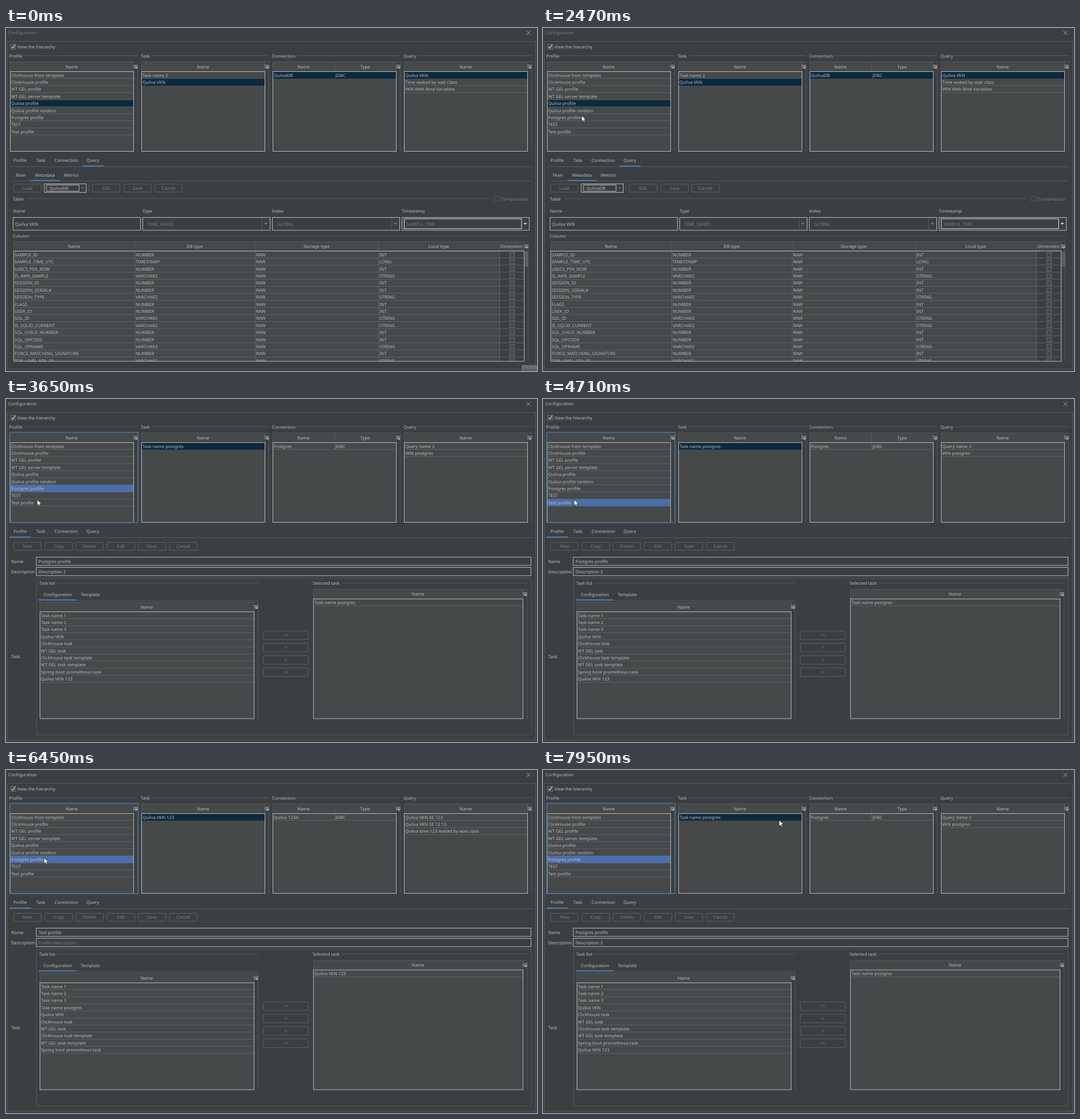
These frames come from a looping animation (930 by 602 pixels, 8000 ms). An HTML page:

```html
<!DOCTYPE html>
<html lang="en">
<head>
<meta charset="utf-8">
<title>Configuration</title>
<style>
html, body { margin: 0; width: 930px; height: 602px; overflow: hidden; background: #3c3f41; }
svg { display: block; }
text { font: 7.7px "Noto Sans", "Open Sans", sans-serif; fill: #bbb; text-rendering: geometricPrecision; white-space: pre; }
.mid { text-anchor: middle; }
.dim { fill: #7d7f80; }
.rule { stroke: #55585a; fill: none; }
.grid { stroke: #66696b; stroke-width: .8; }
.edge { stroke: #b8baba; fill: none; }
.cell { fill: #45494a; }
.btn { fill: none; stroke: #5e6162; }
.box { fill: #43494a; stroke: #6b6e70; }
.idle { fill: #0d293e; }
.pick { fill: #4b6eaf; }
.tab { fill: #4a7ebb; }

.on { animation: 8s step-end infinite; }
.hint { animation-name: hint; }
.before { animation-name: before; }
.after { animation-name: after; }
.pickPg { animation-name: pickPg; }
.pickTest { animation-name: pickTest; }
.dataFirst { animation-name: dataFirst; }
.dataPg { animation-name: dataPg; }
.dataTest { animation-name: dataTest; }
@keyframes hint { 0% { opacity: 1 } .875%, 100% { opacity: 0 } }
@keyframes before { 0% { opacity: 1 } 34.25%, 100% { opacity: 0 } }
@keyframes after { 0% { opacity: 0 } 34.25%, 100% { opacity: 1 } }
@keyframes pickPg { 0%, 58.875% { opacity: 0 } 34.25%, 80.625%, 100% { opacity: 1 } }
@keyframes pickTest { 0%, 80.625%, 100% { opacity: 0 } 58.875% { opacity: 1 } }
@keyframes dataFirst { 0% { opacity: 1 } 35.125%, 100% { opacity: 0 } }
@keyframes dataPg { 0%, 59.75% { opacity: 0 } 35.125%, 81.5%, 100% { opacity: 1 } }
@keyframes dataTest { 0%, 81.5%, 100% { opacity: 0 } 59.75% { opacity: 1 } }

#cursor { animation: move 8s linear infinite; }
@keyframes move {
  0% { transform: translate(945px, 610px); }
  .875% { transform: translate(925px, 598px); animation-timing-function: steps(4, jump-start); }
  4% { transform: translate(270px, 180px); animation-timing-function: steps(4, jump-start); }
  7.1% { transform: translate(114px, 88px); }
  13.875% { transform: translate(114px, 88px); animation-timing-function: steps(8, jump-start); }
  20.675% { transform: translate(89px, 122px); }
  24% { transform: translate(89px, 122px); animation-timing-function: steps(9, jump-start); }
  31.65% { transform: translate(67.5px, 153.5px); }
  36.875% { transform: translate(67.5px, 153.5px); animation-timing-function: steps(9, jump-start); }
  44.64% { transform: translate(57px, 174px); }
  44.75% { transform: translate(57px, 174px); animation-timing-function: steps(2, jump-start); }
  46.45% { transform: translate(54.5px, 176.5px); }
  63.125% { transform: translate(54.5px, 176.5px); animation-timing-function: steps(5, jump-start); }
  67.25% { transform: translate(66.5px, 154px); }
  85.5% { transform: translate(66.5px, 154px); animation-timing-function: steps(9, jump-start); }
  93.26% { transform: translate(477px, 121px); animation-timing-function: steps(3, jump-start); }
  95.85% { transform: translate(458px, 112px); }
  95.875% { transform: translate(458px, 112px); animation-timing-function: steps(5, jump-start); }
  100% { transform: translate(413.5px, 88px); }
}
</style>
</head>
<body>
<svg id="stage" width="930" height="602" viewBox="0 0 930 602"></svg>
<script>
const ROW = 12.41;

const text = (x, y, s, cls = '') =>
  `<text x="${x}" y="${y}" class="${cls}">${s.replace(/</g, '&lt;').replace(/>/g, '&gt;')}</text>`;
const rect = (x, y, r, b, cls) =>
  `<rect x="${x}" y="${y}" width="${r - x}" height="${b - y}" class="${cls}"/>`;
const line = (x1, y1, x2, y2, cls = 'rule') =>
  `<line x1="${x1}" y1="${y1}" x2="${x2}" y2="${y2}" class="${cls}"/>`;
const on = (name, body) => `<g class="on ${name}">${body}</g>`;

const button = (x, y, r, label, h = 14) =>
  `<rect x="${x + .5}" y="${y + .5}" width="${r - x - 1}" height="${h}" rx="1.5" class="btn"/>` +
  text((x + r) / 2, y + h / 2 + 3.3, label, 'mid dim');
const titled = (x, y, label, from, to) => text(x, y, label) + line(from, y - 3, to, y - 3);
const underline = (x, r, y) => rect(x, y - 1.8, r, y, 'tab');
const arrow = (x, y, color) => `<path d="M${x - 3} ${y - 1.5}h6l-3 3.5z" fill="${color}"/>`;
const menuIcon = (x, y) =>
  `<g fill="none" stroke="#9fa2a4" stroke-width=".8"><rect x="${x - 3}" y="${y - 3}" width="6" height="5"/>` +
  `<path d="M${x - 3} ${y - 1}h6M${x} ${y - 3}v3"/></g>` + arrow(x + 1, y + 2, '#afb1b3');

// Header, body and viewport edge of a table; cols are the column borders.
function table(top, body, bottom, cols, heads) {
  const x = cols[0], r = cols.at(-1);
  let s = rect(x, top, r, body, 'cell') + rect(x, body, r, bottom, 'cell') +
    `<path d="M${x + .5} ${body}V${top + .5}H${r + 7.5}V${bottom}" class="rule"/>` +
    line(r + .5, top, r + .5, body) + menuIcon(r + 4, (top + body) / 2 + .3);
  heads.forEach((h, i) => {
    s += text((cols[i] + cols[i + 1]) / 2, (top + body) / 2 + 3.2, h, 'mid');
    if (i) s += line(cols[i] + .5, top, cols[i] + .5, body);
  });
  return s;
}
const frame = (x, y, r, b) => rect(x + .5, y, r + .5, b, 'edge');

// Rows of cells, with an optional highlighted row.
function rows(body, cols, list, picked = -1) {
  const x = cols[0], r = cols.at(-1);
  return list.map((cells, k) => {
    const y = body + ROW * k, end = y + ROW;
    let s = line(x + 1, end - .4, r, end - .4, 'grid'), labels = '';
    [].concat(cells).forEach((c, i) => {
      if (i) s += line(cols[i] + .5, y, cols[i] + .5, end, 'grid');
      labels += text(cols[i] + 2, (y + 9).toFixed(1), c);
    });
    if (k === picked) s += rect(x + 1, y, r, end, 'idle');
    return s + labels;
  }).join('');
}

const profiles = ['Clickhouse from template', 'ClickHouse profile', 'WT GEL profile', 'WT GEL server template',
  'Quilva profile', 'Quilva profile random', 'Postgres profile', 'TEST', 'Test profile'];
const tasks = ['Task name 1', 'Task name 2', 'Task name 3', 'Task name postgres', 'Quilva VKN', 'Clickhouse task',
  'WT GEL task', 'Clickhouse task template', 'WT GEL task template', 'Spring boot prometheus task', 'Quilva VKN 123'];
const topCols = [[7, 223], [237, 453], [467, 575, 683], [697, 913]];
const listCols = [59, 434], chosenCols = [538, 905];

const states = [
  { show: 'dataFirst', name: 'Quilva profile', about: 'Description 2', tasks: ['Task name 2', 'Quilva VKN'], task: 1,
    link: 'QuilvaDB', pick: 0, queries: ['Quilva VKN', 'Time waited by wait class', 'VKN With Bind Variables'] },
  { show: 'dataPg', name: 'Postgres profile', about: 'Description 3', tasks: ['Task name postgres'], task: 0,
    link: 'Postgres', pick: -1, queries: ['Query name 3', 'VKN postgres'] },
  { show: 'dataTest', name: 'Test profile', about: '', tasks: ['Quilva VKN 123'], task: 0,
    link: 'Quilva 1234', pick: -1, queries: ['Quilva VKN EE 123', 'Quilva VKN SE 12 13', 'Quilva time 123 waited by wait class'] }
];

function windowChrome() {
  return on('before', text(4, 11, 'Configuration', 'dim')) + on('after', text(4, 11, 'Configuration')) +
    '<path d="M911.5 5l7 7m0-7l-7 7" stroke="#afb1b3" stroke-width=".9"/>' +
    rect(2.5, 23.5, 927.5, 598.5, 'rule') +
    rect(8, 28.5, 17, 37.5, 'box') + '<path d="M9.8 32.8l2.2 2.6 4-6" fill="none" stroke="#ccc" stroke-width="1.3"/>' +
    text(20, 36, 'View the hierarchy');
}

function hierarchy() {
  const focus = (name, k, cls = 'pick') => on(name, rect(8, 76.5 + ROW * k, 223, 76.5 + ROW * (k + 1), cls));
  let s = titled(5.5, 51.5, 'Profile', 31, 230) + titled(236, 51.5, 'Task', 255, 460) +
    titled(466, 51.5, 'Connection', 509, 690) + titled(696, 51.5, 'Query', 720, 921);
  topCols.forEach((c, i) => s += table(59, 76.5, 216.5, c, i === 2 ? ['Name', 'Type'] : ['Name']));
  s += focus('before', 4, 'idle') + focus('pickPg', 6) + focus('pickTest', 8) + rows(76.5, topCols[0], profiles);
  for (const d of states) {
    s += on(d.show, rows(76.5, topCols[1], d.tasks, d.task) +
      rows(76.5, topCols[2], [[d.link, 'JDBC']], d.pick) + rows(76.5, topCols[3], d.queries, d.pick));
  }
  topCols.forEach(c => s += frame(c[0], 76.5, c.at(-1), 216.5));
  s += on('after', '<rect x="6.5" y="58.5" width="225" height="158.5" fill="none" stroke="#466d94" stroke-width="1.6"/>');
  s += line(6, 243.5, 923, 243.5);
  [[13, 'Profile'], [53, 'Task'], [85, 'Connection'], [141, 'Query']].forEach(([x, t]) => s += text(x, 235, t));
  return s;
}

function queryPanel() {
  const field = (x, value, cls = 'dim') => rect(x + .5, 332.5, x + 223.5, 355, 'edge') + text(x + 8.5, 346.5, value, cls);
  let s = underline(134, 171, 243.2) + line(10, 268.5, 920, 268.5) + underline(43, 94, 268.6) +
    text(17, 260.5, 'Main') + text(51, 260.5, 'Metadata') + text(101, 260.5, 'Metrics');
  [[13, 62, 'Load'], [151, 200, 'Edit'], [206, 255, 'Save'], [260, 309, 'Cancel']]
    .forEach(([x, r, t]) => s += button(x, 273.5, r, t));
  s += rect(67, 273.5, 140.5, 288.5, 'edge') + rect(71, 275.5, 128, 286.5, 'edge') +
    text(76, 283.5, 'QuilvaDB') + arrow(134.5, 281, '#5e6162') + line(145.5, 275, 145.5, 288);
  s += titled(12, 302.5, 'Table', 36, 846) + rect(855.5, 295.5, 864, 304, 'rule') + text(867, 302.5, 'Compression', 'dim');
  ['Name', 'Type', 'Index', 'Timestamp'].forEach((t, i) => s += text(12 + 227 * i, 323.7, t));
  s += field(12, '') + text(16, 346.5, 'Quilva VKN') + field(239, 'TIME_SERIES') + field(466, 'GLOBAL') + field(693, 'SAMPLE_TIME');
  for (const x of [448.5, 675.5]) s += line(x, 333, x, 354.5) + arrow(x + 6.5, 343.5, '#77797a');
  s += '<rect x="697.5" y="334.8" width="205.5" height="17.5" fill="none" stroke="#c2c4c4" stroke-width="1.3"/>' +
    arrow(909.5, 343.5, '#d5d5d5') + titled(12, 367.5, 'Column', 41, 916);

  const cols = [13, 225, 436, 652, 864, 907];
  const locals = { NUMBER: 'INT', VARCHAR2: 'STRING', TIMESTAMP: 'LONG' };
  const fields = ['SAMPLE_ID', 'SAMPLE_TIME_UTC', 'USECS_PER_ROW', 'IS_AWR_SAMPLE', 'SESSION_ID', 'SESSION_SERIAL#',
    'SESSION_TYPE', 'FLAGS', 'USER_ID', 'SQL_ID', 'IS_SQLID_CURRENT', 'SQL_CHILD_NUMBER', 'SQL_OPCODE', 'SQL_OPNAME',
    'FORCE_MATCHING_SIGNATURE', 'TOP_LEVEL_SQL_ID'];
  const kinds = 'NTNVNNVNNVVNNVNV';
  const list = fields.map((f, i) => {
    const kind = { N: 'NUMBER', T: 'TIMESTAMP', V: 'VARCHAR2' }[kinds[i]];
    return [f, kind, 'RAW', locals[kind], ''];
  });
  const checks = fields.map((_, k) => rect(882.5, 394 + ROW * k, 890.5, 402 + ROW * k, 'box')).join('');
  s += table(374.5, 391.7, 585, cols, ['Name', 'DB type', 'Storage type', 'Local type', 'Dimension']) +
    '<clipPath id="view"><rect x="13" y="391" width="895" height="194"/></clipPath><g clip-path="url(#view)">' +
    '<rect x="865" y="392" width="42" height="193" fill="#3c3f41"/>' +
    rows(391.7, cols, list) + checks + '</g>' + frame(13, 391.5, 907, 585) +
    '<rect x="908.5" y="392" width="6.5" height="27" fill="#5c5f61"/>';
  return s;
}

function profilePanel() {
  let s = underline(6, 44, 243.2);
  ['New', 'Copy', 'Delete', 'Edit', 'Save', 'Cancel'].forEach((t, i) => {
    const x = Math.round(13 + 54.6 * i);
    s += button(x, 251, x + 49, t);
  });
  s += text(9, 287.5, 'Name') + text(9, 305.5, 'Description') + text(9, 454.5, 'Task');
  for (const y of [277.5, 295.5]) s += rect(53, y, 919.5, y + 14.5, 'edge');
  s += rect(53.5, 314.5, 919.5, 589.5, 'rule') + '<path d="M55 323h2M534 323h2" class="rule"/>' +
    titled(58, 326, 'Task list', 89, 443) + titled(537, 326, 'Selected task', 588, 914) +
    text(66, 345.5, 'Configuration') + text(131, 345.5, 'Template') +
    line(57, 353.5, 442, 353.5) + underline(57, 123, 353.4) +
    table(356, 373.5, 561, listCols, ['Name']) + table(333.5, 351, 561, chosenCols, ['Name']);
  ['>>', '>', '<', '<<'].forEach((t, i) => s += button(450, 406.5 + 21.7 * i, 530, t, 15));
  for (const d of states) {
    s += on(d.show, text(57, 287.5, d.name) + text(57, 305.5, d.about || 'Profile description', d.about ? '' : 'dim') +
      rows(373.5, listCols, tasks.filter(t => !d.tasks.includes(t))) + rows(351, chosenCols, d.tasks));
  }
  return s + frame(59, 373.5, 434, 561) + frame(538, 351, 905, 561);
}

document.getElementById('stage').innerHTML =
  windowChrome() + hierarchy() + on('before', queryPanel()) + on('after', profilePanel()) +
  on('hint', '<rect x="903" y="591.5" width="27" height="11" fill="#6a6d6f"/><text x="907" y="603" style="fill:#45484a">Refresh</text>') +
  '<path id="cursor" d="M0 0V10.6L2.5 8.3 4.2 12 6 11.2 4.4 7.6H7.8Z" fill="#fff" stroke="#111" stroke-width=".7"/>';
</script>
</body>
</html>
```
